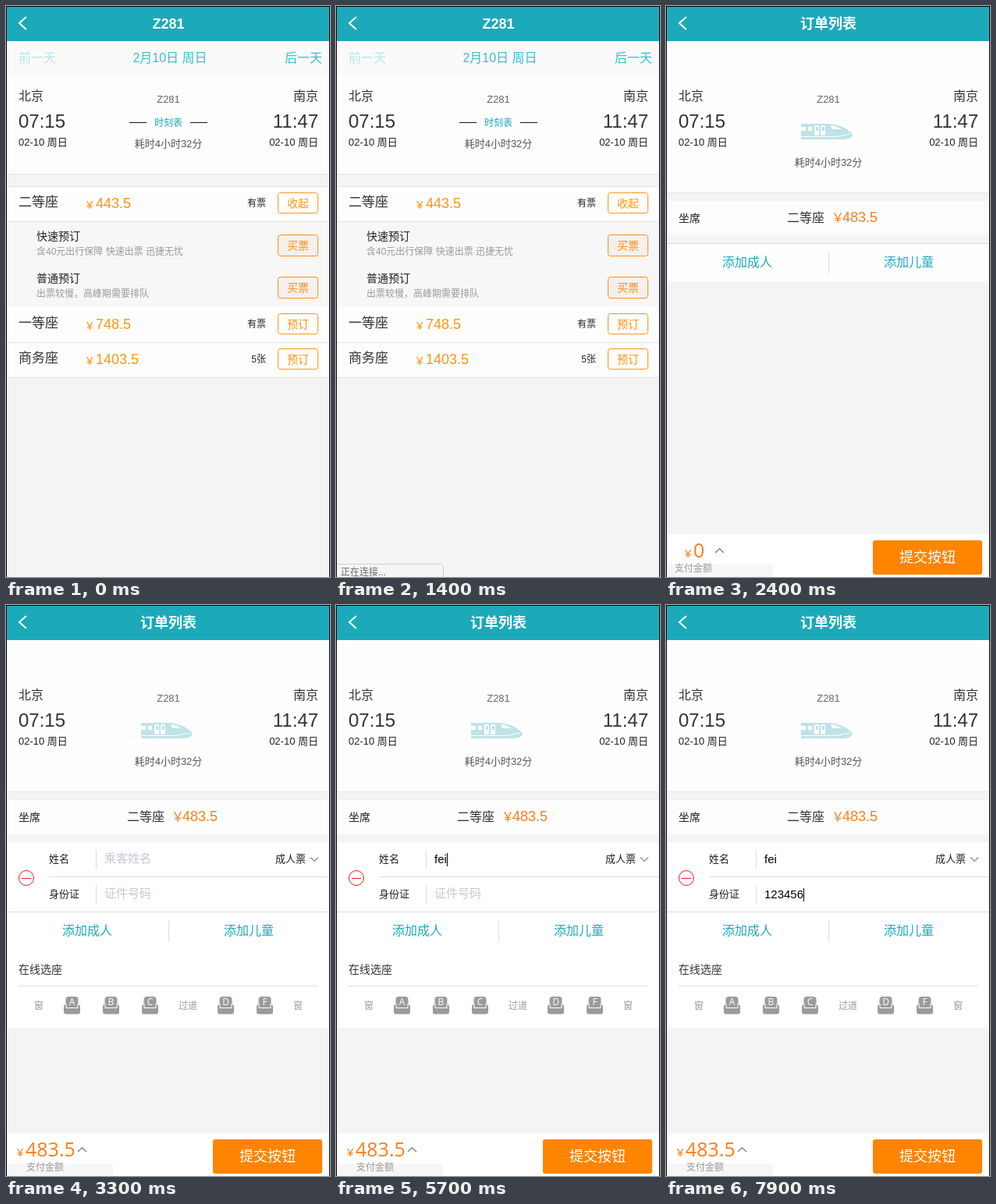
An HTML page with a canvas that plays this animation: 415x732 px, repeating every 8000 ms.

```html
<!DOCTYPE html>
<html lang="zh-CN">
<head>
<meta charset="utf-8">
<title>车票预订</title>
<style>
html, body { margin: 0; width: 100%; height: 100%; overflow: hidden; background: #f4f4f4; }
canvas { display: block; width: 415px; height: 732px; }
</style>
</head>
<body>
<canvas id="stage"></canvas>
<script>
const W = 415, H = 732, LOOP = 8000;
const canvas = document.getElementById('stage');
const ctx = canvas.getContext('2d');
const dpr = window.devicePixelRatio || 1;
canvas.width = Math.round(W * dpr);
canvas.height = Math.round(H * dpr);

const SANS = '"Liberation Sans", "Noto Sans CJK SC", "Noto Sans CJK", sans-serif';
const HUMANIST = '"Open Sans", "Noto Sans", sans-serif';
const TEAL = '#1ca9b9', INK = '#222', ORANGE = '#ff9510', DEEP = '#ff7d1a';
const GAP = '#f4f4f4', RULE = '#e2e2e2', PALE = '#bfe3e7';

function rect(x, y, w, h, color) {
  ctx.fillStyle = color;
  ctx.fillRect(x, y, w, h);
}

function roundBox(x, y, w, h, r, fill, stroke) {
  ctx.beginPath();
  ctx.roundRect(x, y, w, h, r);
  if (fill) { ctx.fillStyle = fill; ctx.fill(); }
  if (stroke) { ctx.strokeStyle = stroke; ctx.lineWidth = 1; ctx.stroke(); }
}

function line(points, color, width) {
  ctx.beginPath();
  points.forEach(([x, y]) => ctx.lineTo(x, y));
  ctx.strokeStyle = color;
  ctx.lineWidth = width;
  ctx.stroke();
}

// cy is the optical middle of the glyphs
function text(str, x, cy, size, color, align = 'left', weight = 'normal', family = SANS) {
  ctx.font = `${weight} ${size}px ${family}`;
  ctx.textAlign = align;
  ctx.fillStyle = color;
  ctx.fillText(str, x, Math.round(cy + size * 0.36));
}

function header(title) {
  rect(1, 1, 413, 44, TEAL);
  line([[26, 14], [17, 22], [26, 30]], '#fff', 2);
  text(title, 208, 23, 18, '#fff', 'center', 'bold');
}

function frame() {
  rect(0, 0, W, 1, '#000');
  rect(0, 0, 1, H, '#000');
  rect(414, 0, 1, H, '#000');
}

function station(city, time, date, x, align, dateY) {
  text(city, x, 115, 16, '#333', align);
  text(time, x, 147, 24, '#333', align);
  text(date, x, dateY, 13, INK, align);
}

function stations(loaded) {
  const dateY = loaded ? 174 : 139;
  station('北京', loaded ? '07:15' : '', '02-10 周日', 16, 'left', dateY);
  station('南京', loaded ? '11:47' : '', '02-10 周日', 400, 'right', dateY);
  text('Z281', 208, 119, 13, '#666', 'center');
}

function button(label, y, h, color, fill) {
  roundBox(348.5, y + 0.5, 51, h - 1, 3, fill, color);
  text(label, 374, y + h / 2, 14, color, 'center');
}

function seatClass(name, price, left, label, y) {
  text(name, 16, y + 19, 17, '#333');
  text('¥', 103, y + 23, 15, ORANGE);
  text(price, 115, y + 21, 18, ORANGE);
  text(left, 333, y + 21, 12, INK, 'right');
  button(label, y + 7, 27, ORANGE, '#fff');
}

function offer(name, note, y) {
  text(name, 39, y + 2, 14, INK);
  text(note, 39, y + 22, 12, '#999');
  button('买票', y, 28, '#ff8c1a', '#f5f0ec');
}

function trainPage() {
  rect(0, 0, W, H, GAP);
  header('Z281');

  rect(1, 45, 413, 44, '#fafafa');
  text('前一天', 16, 66, 16, '#b4e6e8');
  text('2月10日 周日', 210, 66, 16, '#38bfca', 'center');
  text('后一天', 405, 66, 16, '#38bfca', 'right');

  rect(1, 89, 413, 126, '#fdfdfd');
  stations(true);
  rect(158, 149, 22, 1, '#111');
  rect(236, 149, 22, 1, '#111');
  text('时刻表', 208, 150, 12, TEAL, 'center');
  text('耗时4小时32分', 208, 176, 13, '#555', 'center');

  rect(1, 232, 413, 244, '#fdfdfd');
  rect(1, 277, 413, 108, '#f7f7f7');
  [215, 231, 276, 431, 476].forEach(y => rect(1, y, 413, 1, RULE));
  seatClass('二等座', '443.5', '有票', '收起', 232);
  offer('快速预订', '含40元出行保障 快速出票 迅捷无忧', 293);
  offer('普通预订', '出票较慢，高峰期需要排队', 347);
  seatClass('一等座', '748.5', '有票', '预订', 387);
  seatClass('商务座', '1403.5', '5张', '预订', 432);
}

function train() {
  ctx.beginPath();
  ctx.moveTo(173, 151);
  ctx.lineTo(209, 151);
  ctx.bezierCurveTo(222, 152, 235, 158, 239, 165);
  ctx.quadraticCurveTo(239, 170, 228, 171);
  ctx.lineTo(173, 171);
  ctx.fillStyle = PALE;
  ctx.fill();
  rect(173, 155, 6, 5, '#fff');
  rect(182, 155, 5, 5, '#fff');
  roundBox(190, 153, 6, 13, 2, '#fff');
  roundBox(198, 153, 6, 13, 2, '#fff');
  rect(192, 155, 3, 5, PALE);
  rect(200, 155, 3, 5, PALE);
  ctx.beginPath();
  ctx.moveTo(211, 153);
  ctx.quadraticCurveTo(219, 154, 225, 158);
  ctx.lineTo(213, 158);
  ctx.fillStyle = '#fff';
  ctx.fill();
  line([[173, 167.5], [218, 167.5], [236, 164]], '#fff', 1);
}

function addRow(y) {
  text('添加成人', 104, y, 16, TEAL, 'center');
  text('添加儿童', 311, y, 16, TEAL, 'center');
  rect(208, y - 13, 1, 28, '#ddd');
}

function field(label, value, hint, y) {
  text(label, 55, y, 13, INK);
  rect(115, y - 11, 1, 24, '#ddd');
  if (value) text(value, 126, y + 1, 15, '#000');
  else text(hint, 126, y, 15, '#c3c7ce');
}

function caret(value, y) {
  ctx.font = `15px ${SANS}`;
  const x = 126 + Math.round(ctx.measureText(value).width);
  rect(x, y - 7, 1, 17, '#000');
}

function seat(letter, cx) {
  roundBox(cx - 8, 502, 16, 15, 4, '#9b9b9b');
  roundBox(cx - 10.5, 512, 21, 12.5, 3, '#9b9b9b');
  line([[cx - 7.5, 511], [cx - 7.5, 516.5], [cx + 7.5, 516.5], [cx + 7.5, 511]], '#fff', 1);
  text(letter, cx, 509, 12, '#fff', 'center', 'normal', HUMANIST);
}

function passenger(name, id, focus) {
  rect(1, 304, 413, 238, '#fff');
  ctx.beginPath();
  ctx.arc(26, 350, 9.5, 0, Math.PI * 2);
  ctx.strokeStyle = '#f01818';
  ctx.lineWidth = 1;
  ctx.stroke();
  rect(20, 350, 12, 1, '#f01818');

  field('姓名', name, '乘客姓名', 325);
  field('身份证', id, '证件号码', 370);
  text('成人票', 384, 325, 13, INK, 'right');
  line([[390, 323.5], [395, 328.5], [400, 323.5]], '#888', 1.2);
  rect(55, 348, 359, 1, '#ddd');
  rect(1, 393, 413, 1, '#ddd');
  if (focus === 'name') caret(name, 325);
  if (focus === 'id') caret(id, 370);

  addRow(417);
  text('在线选座', 16, 467, 14, '#333');
  rect(16, 488, 384, 1, '#ddd');
  text('窗', 42, 514, 12, '#999', 'center');
  text('过道', 233, 514, 12, '#999', 'center');
  text('窗', 374, 514, 12, '#999', 'center');
  seat('A', 84.5);
  seat('B', 134.5);
  seat('C', 184.5);
  seat('D', 281.5);
  seat('F', 331.5);
}

function payBar(total, signX, sumX, arrowX, labelX) {
  rect(1, 677, 413, 55, '#fff');
  roundBox(1, 716, 136, 20, [0, 3, 0, 0], '#f6f6f6');
  text('¥', signX, 702, 15, DEEP);
  text(total, sumX, 698, 25, DEEP, 'left', 'normal', HUMANIST);
  line([[arrowX, 701], [arrowX + 5.5, 695.5], [arrowX + 11, 701]], '#777', 1.2);
  text('支付金额', labelX, 721, 12, '#999');
  roundBox(265, 685, 140, 44, 3, '#ff8400');
  text('提交按钮', 335, 707, 18, '#fff', 'center');
}

function orderPage(t) {
  const loaded = t >= 2400;
  rect(0, 0, W, H, GAP);
  header('订单列表');
  rect(1, 45, 413, 194, '#fefefe');
  rect(1, 239, 413, 1, '#e6e6e6');
  stations(loaded);
  train();
  rect(1, 250, 413, 44, '#fdfdfd');
  text('坐席', 16, 272, 14, INK);
  if (loaded) {
    text('耗时4小时32分', 208, 200, 13, '#555', 'center');
    text('二等座', 155, 271, 16, '#333');
    text('￥', 212, 271, 16, DEEP, 'left', 300);
    text('483.5', 226, 271, 18, DEEP);
  }

  if (t < 3300) {
    rect(1, 304, 413, 49, '#fefefe');
    rect(1, 304, 413, 1, '#ddd');
    addRow(328);
    payBar('0', 24, 35, 63, 11);
  } else {
    passenger(typed('fei', NAME_KEYS, t), typed('123456', ID_KEYS, t), focusAt(t));
    payBar('483.5', 14, 25, 92, 26);
  }
}

// Key times in ms, one per character
const NAME_KEYS = [5500, 5600, 5700];
const ID_KEYS = [7600, 7700, 7700, 7900, 7900, 7900];

function typed(str, keys, t) {
  return str.slice(0, keys.filter(k => t >= k).length);
}

function focusAt(t) {
  const on = (a, b) => t >= a && t < b;
  if (on(4200, 4600) || on(5100, 6700)) return 'name';
  if (on(6700, 7200) || t >= 7600) return 'id';
  return '';
}

function statusBubble(t) {
  if (t < 1400 || t >= 2200) return;
  ctx.globalAlpha = t < 2100 ? 1 : 0.5;
  roundBox(-0.5, 715.5, 138, 24, [0, 4, 0, 0], '#f5f5f5', '#d0d0d0');
  text('正在连接...', 6, 726, 12, '#666');
  ctx.globalAlpha = 1;
}

function draw(now) {
  const t = now % LOOP;
  ctx.setTransform(dpr, 0, 0, dpr, 0, 0);
  if (t < 1600) trainPage();
  else orderPage(t);
  statusBubble(t);
  frame();
}

const start = performance.now();
function tick() {
  draw(performance.now() - start);
  requestAnimationFrame(tick);
}
tick();
</script>
</body>
</html>
```
